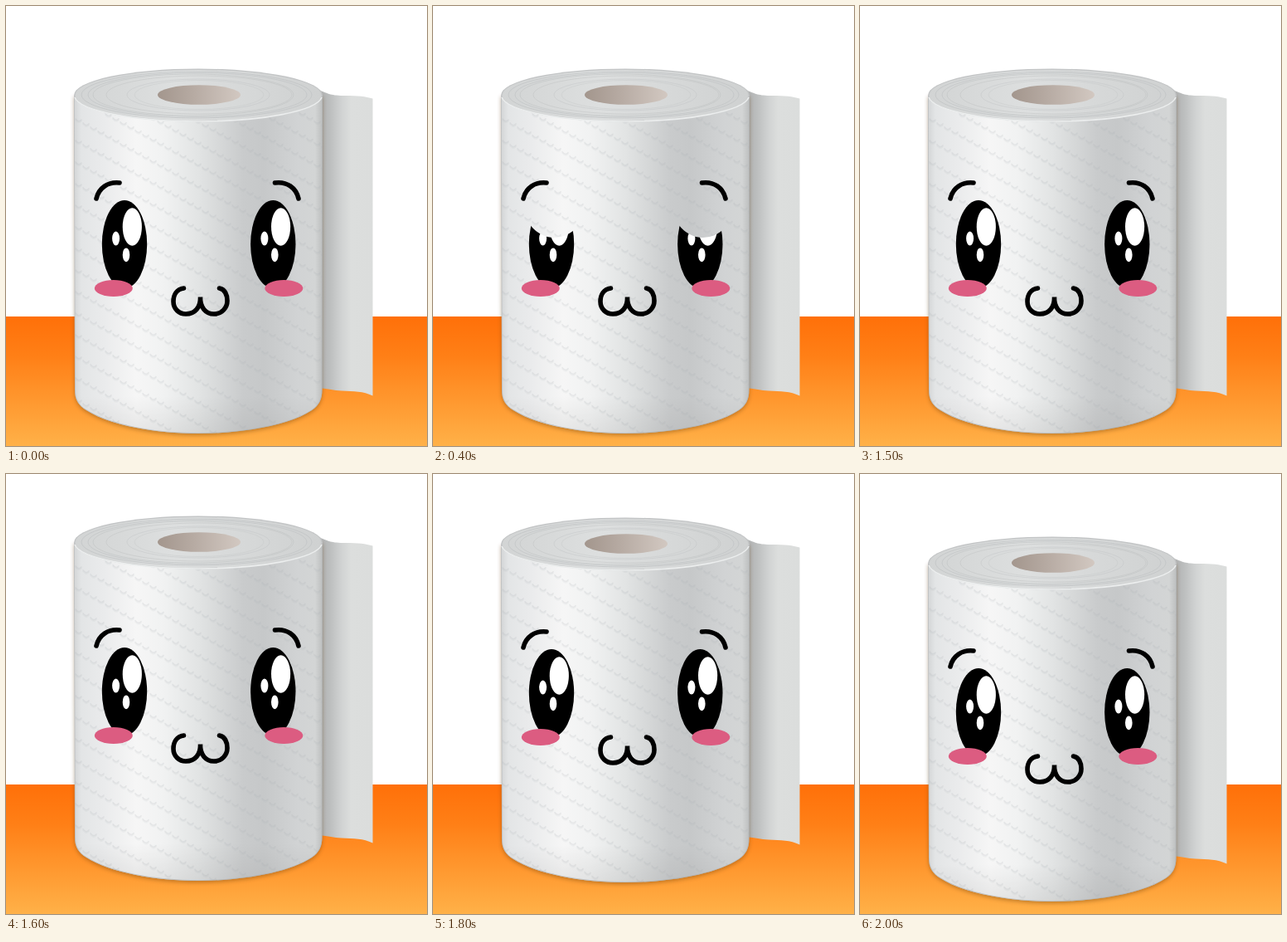
Animation, 508 px wide and 530 px high, one loop 4 s. Source, as an HTML page:

```html
<!DOCTYPE html>
<html lang="en">
<head>
<meta charset="utf-8">
<title>Blinking paper roll</title>
<style>
  html, body { margin: 0; width: 100%; height: 100%; overflow: hidden; background: #fff; }
  svg { display: block; width: 100vw; height: 100vh; }
</style>
</head>
<body>
<svg viewBox="0 0 508 530" xmlns="http://www.w3.org/2000/svg">
  <defs>
    <linearGradient id="floor" x2="0" y2="1">
      <stop offset="0" stop-color="#ff7009"/>
      <stop offset=".3" stop-color="#ff7f16"/>
      <stop offset="1" stop-color="#ffb148"/>
    </linearGradient>
    <linearGradient id="paper">
      <stop offset="0" stop-color="#d3d5d6"/>
      <stop offset=".03" stop-color="#e3e5e6"/>
      <stop offset=".12" stop-color="#eaebec"/>
      <stop offset=".25" stop-color="#f6f6f6"/>
      <stop offset=".36" stop-color="#f1f2f2"/>
      <stop offset=".5" stop-color="#e2e4e4"/>
      <stop offset=".68" stop-color="#c9cbcc"/>
      <stop offset=".76" stop-color="#c6c8c9"/>
      <stop offset=".9" stop-color="#d1d3d4"/>
      <stop offset=".97" stop-color="#d3d5d5"/>
      <stop offset="1" stop-color="#bcbebe"/>
    </linearGradient>
    <linearGradient id="base" gradientUnits="userSpaceOnUse" x1="0" y1="470" x2="0" y2="516">
      <stop offset="0" stop-color="#888" stop-opacity="0"/>
      <stop offset="1" stop-color="#888" stop-opacity=".16"/>
    </linearGradient>
    <linearGradient id="lidTop">
      <stop offset="0" stop-color="#d2d4d4"/>
      <stop offset=".4" stop-color="#dddfdf"/>
      <stop offset="1" stop-color="#cfd1d1"/>
    </linearGradient>
    <linearGradient id="tube">
      <stop offset="0" stop-color="#a3968d"/>
      <stop offset=".4" stop-color="#b5a9a1"/>
      <stop offset="1" stop-color="#d2c8c1"/>
    </linearGradient>
    <linearGradient id="flap">
      <stop offset="0" stop-color="#aeb0b0"/>
      <stop offset=".2" stop-color="#bbbdbd"/>
      <stop offset=".42" stop-color="#d0d2d2"/>
      <stop offset=".6" stop-color="#dcdedd"/>
      <stop offset="1" stop-color="#dbdddc"/>
    </linearGradient>
    <filter id="soft" x="-10%" y="-10%" width="120%" height="120%">
      <feGaussianBlur stdDeviation="2.5"/>
    </filter>
    <path id="side" d="M82 107 L83 462 C83 474 87 481 97 487 C125 505 180 515 232 515 C285 515 342 505 369 487 C378 481 381.500 474 381.500 462 L382 107 Z"/>
    <clipPath id="sideClip"><use href="#side"/></clipPath>
    <mask id="open" maskUnits="userSpaceOnUse" x="100" y="220" width="90" height="130">
      <rect x="100" y="220" width="90" height="130" fill="#fff"/>
      <ellipse id="lid" cx="143" rx="40" ry="48" transform="rotate(3 143 310)" fill="#000"/>
    </mask>
    <g id="eye">
      <g mask="url(#open)">
        <ellipse cx="143" cy="287" rx="27.200" ry="53"/>
        <g fill="#fff">
          <ellipse cx="152.300" cy="266" rx="11.600" ry="22.700"/>
          <ellipse cx="132.600" cy="280" rx="4.500" ry="8.600"/>
          <ellipse cx="145" cy="299.800" rx="4.300" ry="8.400"/>
        </g>
      </g>
    </g>
  </defs>

  <rect width="508" height="530" fill="#fff"/>
  <rect y="374" width="508" height="156" fill="url(#floor)"/>

  <g id="roll">
    <path d="M377 101 C390 106 392 108 410 108 C425 108 434 109 442.500 111.500 V469.500 C431 464 420 464 405 463.500 C395 463 390 461 377 460 Z" fill="url(#flap)"/>
    <use href="#side" y="2" fill="#5a3000" opacity=".38" filter="url(#soft)"/>
    <use href="#side" fill="url(#paper)"/>
    <g clip-path="url(#sideClip)" fill="none" stroke-linecap="round">
      <path id="emboss" stroke="#a9b0b4" stroke-opacity=".2" stroke-width="1.500"/>
      <use href="#emboss" y="1.500" style="mix-blend-mode:screen" opacity=".5"/>
      <use href="#side" stroke="#aaaeb0" stroke-opacity=".6" stroke-width="1.500"/>
    </g>
    <use href="#side" fill="url(#base)"/>

    <ellipse cx="232" cy="107.500" rx="150" ry="32" fill="#c3c5c6"/>
    <ellipse cx="232" cy="107.500" rx="148.500" ry="30.500" fill="url(#lidTop)"/>
    <path d="M83 110 A149.500 31.500 0 0 0 381 110" fill="none" stroke="#eceeee" stroke-width="1.600"/>
    <g id="rings" fill="none" stroke="#bfc2c3" stroke-width="1"></g>
    <ellipse cx="233" cy="107" rx="50" ry="11.800" fill="url(#tube)"/>

    <use href="#eye"/>
    <use href="#eye" x="179.300"/>
    <g fill="#dc5c81">
      <ellipse cx="129.800" cy="340" rx="23" ry="10"/>
      <ellipse cx="335.300" cy="340" rx="23" ry="10"/>
    </g>
    <g fill="none" stroke="#000" stroke-width="5.600" stroke-linecap="round">
      <path d="M109 232 C112 219 123 211.500 137 213"/>
      <path d="M324.500 213 C339 211 350 219 353 232"/>
      <path d="M214.500 340 C206 341 202 348 202 356 C202 365 209 371 217 371 C228 371 235 363 234.500 350.500 C234 363 241 371 251 371 C260 371 267 364 267 355 C267 348 264 341 257.500 340"/>
    </g>
  </g>
</svg>

<script>
  const LOOP = 4000;
  // [time, value] pairs; each value holds until the next time
  const lift = [[0, 0], [1600, -25], [1700, -50], [1800, -23], [1900, 0]];
  const lidY = [[0, 150], [100, 231], [200, 271], [300, 271], [400, 231], [500, 150]];

  const $ = id => document.getElementById(id);
  const at = (steps, t) => steps.filter(s => s[0] <= t).pop()[1];

  // embossed rows of small scallops running down to the right
  let d = "";
  for (let y0 = -20; y0 < 520; y0 += 26) {
    for (let x = 84; x < 382; x += 9) {
      const y = y0 + (x - 84) * 0.55;
      if (y > 125 && y < 512) d += `M${x} ${y.toFixed(1)}q4 5 7 1`;
    }
  }
  $("emboss").setAttribute("d", d);

  // paper layers on the top face: centre x, rx, ry
  const layers = [[230, 139, 28], [231, 132, 26.5], [226, 121, 25], [233, 112, 23], [232, 86, 19], [233, 78, 17.5]];
  $("rings").innerHTML = layers.map(([cx, rx, ry], i) =>
    `<ellipse cx="${cx}" cy="107" rx="${rx}" ry="${ry}" opacity="${0.7 - i * 0.07}"/>`).join("");

  function draw() {
    const t = performance.now() % LOOP;
    $("roll").setAttribute("transform", `translate(0 ${at(lift, t)})`);
    $("lid").setAttribute("cy", at(lidY, t));
    requestAnimationFrame(draw);
  }
  draw();
</script>
</body>
</html>
```
